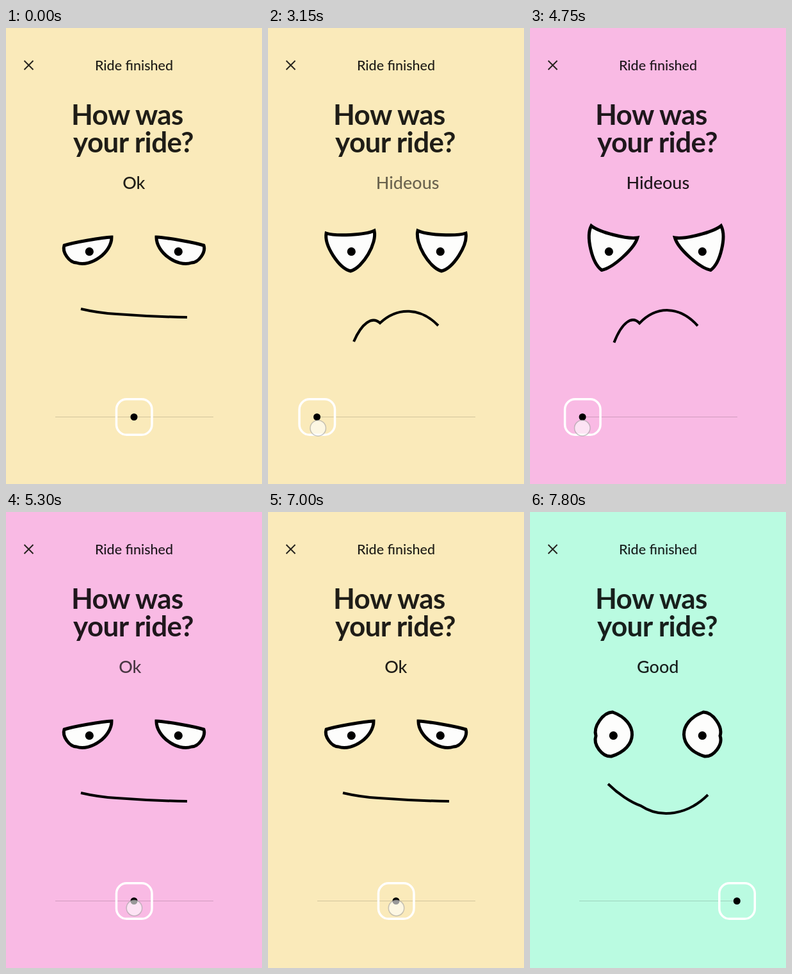
These frames come from a looping animation (400x711 px, 8000 ms). An HTML page:

```html
<!DOCTYPE html>
<html lang="en">
<head>
<meta charset="utf-8">
<title>Ride rating</title>
<style>
html, body { margin: 0; width: 100%; height: 100%; overflow: hidden; }
svg { display: block; width: 100vw; height: 100vh; }
text { font-family: Lato, "Open Sans", sans-serif; fill: rgba(0, 0, 0, .88); }
.title { font-size: 21.5px; font-weight: 500; text-anchor: middle; }
.head { font-size: 44px; font-weight: 700; letter-spacing: -.6px; }
.mood { font-size: 27px; font-weight: 500; text-anchor: middle; }
.eye { fill: #fdfdfc; stroke: #000; stroke-width: 5; }
.mouth { fill: none; stroke: #000; stroke-width: 4; }
</style>
</head>
<body>
<svg viewBox="0 0 400 711">
  <rect id="bg" width="400" height="711"/>
  <path d="M28.5 51 42.5 65M42.5 51 28.5 65" stroke="#25221d" stroke-width="2"/>
  <text class="title" x="200" y="65.5">Ride finished</text>
  <text class="head" x="102" y="151">How was</text>
  <text class="head" x="105" y="194">your ride?</text>
  <text class="mood" id="mood" y="251"></text>
  <path class="eye" id="eyeL"/>
  <path class="eye" id="eyeR"/>
  <circle id="pupilL" cy="348.7" r="6.6"/>
  <circle cx="269.3" cy="348.7" r="6.6"/>
  <path class="mouth" id="mouth"/>
  <path d="M77 606.5H324" stroke="#000" stroke-opacity=".16"/>
  <g id="handle">
    <rect x="-27.5" y="578.8" width="55.5" height="55.5" rx="16" fill="none" stroke="#fff" stroke-width="3.5"/>
    <circle cy="606.5" r="5.5"/>
  </g>
  <circle id="touch" r="12.2" fill="#fff" fill-opacity=".6" stroke="#999" stroke-opacity=".55" stroke-width="1.5"/>
</svg>
<script>
const LOOP = 8000, STEP = 50;
const $ = id => document.getElementById(id);
const span = (t, a, b) => Math.min(1, Math.max(0, (t - a) / (b - a)));
const inOut = u => (1 - Math.cos(Math.PI * u)) / 2;
const out = u => 1 - (1 - u) ** 3;
const mix = (a, b, u) => Array.isArray(a) ? a.map((v, i) => mix(v, b[i], u)) : a + (b - a) * u;
const set = (id, attrs) => {
  for (const k in attrs) $(id).setAttribute(k, attrs[k]);
};

// each row: x, y and the bulge of the edge that leaves the point
const sulky = {
  eye: [[91, 320, -6], [166, 316, 14], [129, 379, 13]],
  mouth: [[134, 489, 20], [175, 460, 27], [266, 464, 0]],
  lean: 0
};
const moods = {
  ok: {
    label: 'Ok', knob: 200, color: [250, 234, 186], lean: 0,
    eye: [[91, 339, 2], [165, 326, 19.5], [110, 366, 9]],
    mouth: [[117, 438, -1.5], [173, 446, -1], [283, 451, 0]]
  },
  angry: {
    label: 'Hideous', knob: 76.5, color: [249, 186, 228], lean: 1, via: sulky,
    eye: [[96, 307, -7], [168, 327, 9], [112, 378, 12.5]],
    mouth: [[132, 493, 23], [171, 461, 31], [261, 465, 0]]
  },
  good: {
    label: 'Good', knob: 323.3, color: [186, 251, 225], lean: 0,
    eye: [[103, 349, 12], [129, 312, 42], [127, 381, 12]],
    mouth: [[122, 424, -5], [173, 458, -26], [278, 441, 0]]
  }
};
const drags = [
  { at: 2500, from: moods.ok, to: moods.angry },
  { at: 4620, from: moods.angry, to: moods.ok },
  { at: 7000, from: moods.ok, to: moods.good }
];

// cubic from a to b, pushed sideways along the normal n by the bulge of a
function arc(a, b, k, n) {
  const ctrl = f => [0, 1].map(i => mix(a[i], b[i], f) + n[i] * a[2]);
  return `C${ctrl(k)} ${ctrl(1 - k)} ${b.slice(0, 2)}`;
}
function eyePath(p) {
  const edges = p.map((a, i) => {
    const b = p[(i + 1) % p.length];
    const dx = b[0] - a[0], dy = b[1] - a[1], len = Math.hypot(dx, dy);
    return arc(a, b, .2, [dy / len, -dx / len]);
  });
  return `M${p[0].slice(0, 2)}${edges.join('')}Z`;
}
function mouthPath(p) {
  const edges = p.slice(1).map((b, i) => arc(p[i], b, .3, [0, -1]));
  return `M${p[0].slice(0, 2)}${edges.join('')}`;
}

function drawFace({ from, to }, move, settle) {
  const via = to.via || to;
  const part = k => mix(mix(from[k], via[k], move), to[k], settle);
  const lean = part('lean'), eye = eyePath(part('eye'));
  set('eyeL', { d: eye });
  set('eyeR', { d: eye, transform: `translate(${400 - 6 * lean} 0) scale(-1 1)` });
  set('pupilL', { cx: 130.3 - 7.3 * lean });
  set('mouth', { d: mouthPath(part('mouth')) });
}

function drawMood({ from, to }, ms) {
  const swap = 520, entering = ms >= swap;
  const u = entering ? span(ms, swap, swap + 200) : 1 - span(ms, swap - 200, swap);
  const side = Math.sign(from.knob - to.knob) * (entering ? 1 : -1);
  $('mood').textContent = (entering ? to : from).label;
  set('mood', { x: 199.8 + side * 150 * (1 - u) ** 2, opacity: u });
}

function draw(time) {
  const t = time - time % STEP;
  const drag = drags.filter(d => d.at <= t).pop() || drags[0];
  const { from, to } = drag, ms = t - drag.at;
  const move = inOut(span(ms, 50, 640));
  const touchX = mix(from.knob, to.knob, inOut(span(ms, 50, 690))) + .5;
  const color = mix(from.color, to.color, span(ms, 680, 800));

  set('bg', { fill: `rgb(${color.map(Math.round)})` });
  set('handle', { transform: `translate(${mix(from.knob, to.knob, move)} 0)` });
  set('touch', {
    cx: touchX, cy: 617.5 + (200 - touchX) * .053,
    opacity: t >= 2500 && t < 7750 ? 1 : 0
  });
  drawMood(drag, ms);
  drawFace(drag, move, out(span(ms, 650, 1150)));
}

const began = performance.now();
function tick() {
  draw((performance.now() - began) % LOOP);
  requestAnimationFrame(tick);
}
tick();
</script>
</body>
</html>
```
